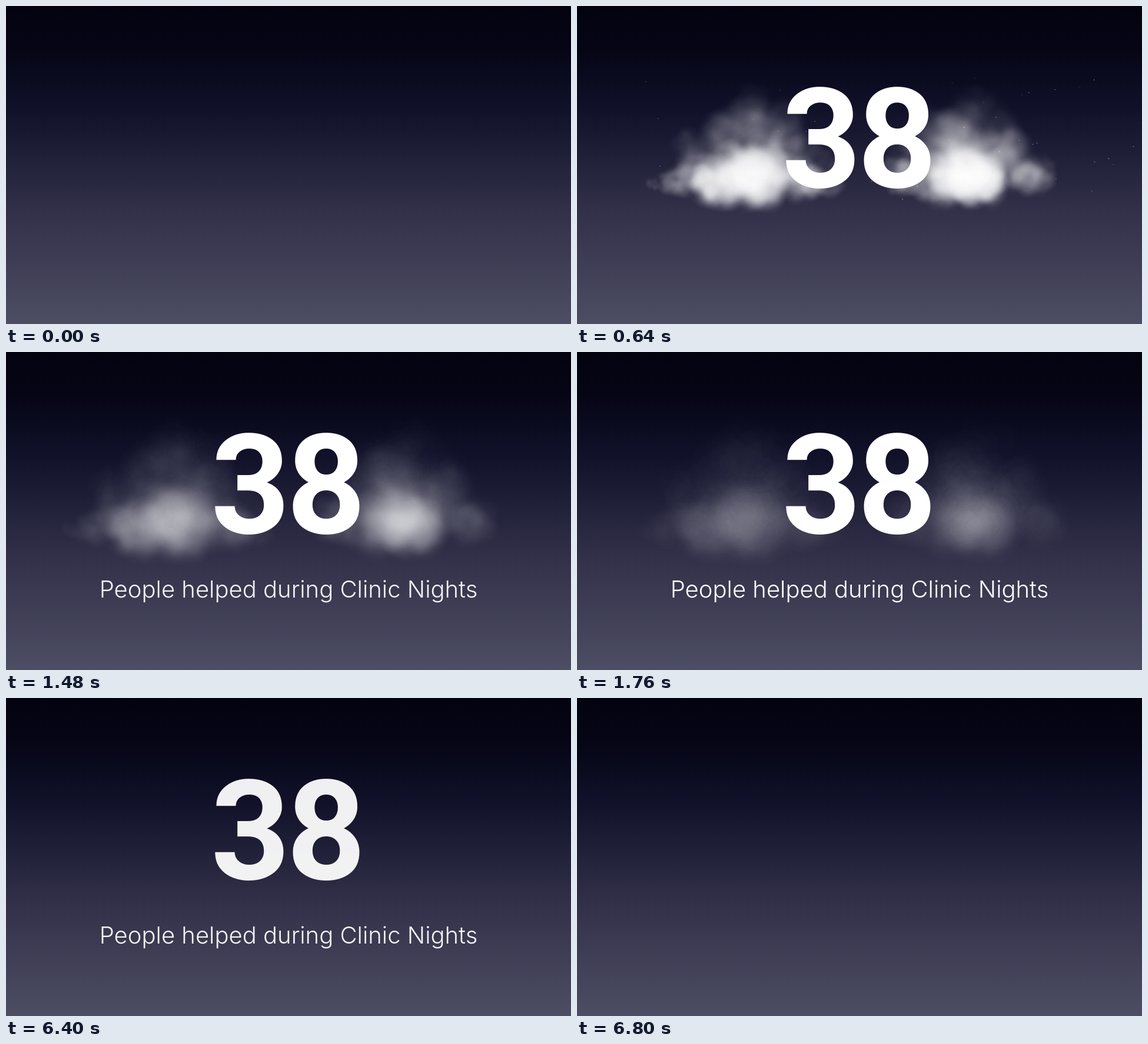
An HTML page with a canvas for the animation above (6.88 s loop, 960 px wide and 540 px high).

```html
<!DOCTYPE html>
<html lang="en">
<head>
<meta charset="utf-8">
<title>38 people helped</title>
<style>
  html, body { margin: 0; width: 100%; height: 100%; overflow: hidden; }
  body {
    position: relative;
    background: linear-gradient(#030310, #050515 13%, #11112a 33%, #323149 65%, #4d4d64);
  }
  canvas, svg { position: absolute; left: 0; top: 0; width: 960px; height: 540px; }
  text { fill: #fff; }
  .number {
    font: bold 235px Roboto, "Liberation Sans", sans-serif;
    letter-spacing: -6px;
    animation: drop 6880ms infinite, leave 6880ms linear infinite;
  }
  .caption {
    font: 300 40px Inter, "Liberation Sans", sans-serif;
    font-optical-sizing: none;
    text-anchor: middle;
    animation: appear 6880ms linear infinite;
  }
  @keyframes drop {
    0%, .87% { transform: translateY(-330px); animation-timing-function: cubic-bezier(.333, 0, .667, .333); }
    4.36%, 100% { transform: none; }
  }
  @keyframes leave {
    0%, 92.7% { opacity: 1; }
    98.83%, 100% { opacity: 0; }
  }
  @keyframes appear {
    0%, 11.63% { opacity: 0; }
    22.09%, 92.7% { opacity: 1; }
    98.83%, 100% { opacity: 0; }
  }
</style>
</head>
<body>
<canvas width="960" height="540"></canvas>
<svg viewBox="0 0 960 540">
  <text class="number" x="348" y="307.5">38</text>
  <text class="caption" x="480" y="417">People helped during Clinic Nights</text>
</svg>
<script>
const LOOP = 6880, IMPACT = 300, SETTLED = 640, CLEAR = 2080;
const CENTER = 480, GROUND = 304;
const ctx = document.querySelector('canvas').getContext('2d');

let seed = 38;
const random = () => (seed = (seed * 16807) % 2147483647) / 2147483647;
const between = (a, b) => a + (b - a) * random();
const repeat = (count, make) => Array.from({ length: count }, (_, i) => make(i));

// Lumpy white puff built from overlapping soft discs
function makePuffSprite() {
  const sprite = document.createElement('canvas');
  sprite.width = sprite.height = 128;
  const g = sprite.getContext('2d');
  for (let i = 0; i < 30; i++) {
    const angle = between(0, Math.PI * 2), dist = 36 * Math.sqrt(random());
    const x = 64 + dist * Math.cos(angle), y = 64 + dist * Math.sin(angle);
    const soft = g.createRadialGradient(x, y, 0, x, y, between(18, 28));
    soft.addColorStop(0, 'rgba(255,255,255,.2)');
    soft.addColorStop(1, 'rgba(255,255,255,0)');
    g.fillStyle = soft;
    g.fillRect(0, 0, 128, 128);
  }
  return sprite;
}
const sprites = repeat(4, makePuffSprite);

// Two mirrored lobes: puffs are larger and rise higher mid-lobe, thinner towards the top
function makePuff(i) {
  const side = i % 2 ? 1 : -1;
  const reach = (random() + random()) / 2;
  const hump = Math.sin(Math.PI * reach);
  const height = random() ** 2;
  const offset = side * (10 + 350 * reach);
  return {
    fromX: CENTER + offset * .5,
    x: CENTER + offset,
    y: GROUND + between(-10, 6) - 135 * hump * height,
    r: (14 + 28 * hump) * between(.85, 1.2),
    alpha: .06 + .38 * (1 - height) ** 1.5 * Math.sqrt(hump),
    turn: between(0, Math.PI * 2),
    sprite: sprites[i % sprites.length]
  };
}
const puffs = repeat(170, makePuff);

const sparks = repeat(50, () => ({
  x: CENTER + between(-110, 110),
  vx: between(-950, 1150),
  vy: between(-620, 0),
  size: between(1, 2.2),
  alpha: between(.25, .8)
}));

const expansion = t => 1 - Math.exp(-(t - IMPACT) / 150);

function drawSmoke(t) {
  const spread = expansion(t) / expansion(SETTLED);
  const late = Math.max(0, t - SETTLED) / 1000;
  const density = ((CLEAR - t) / (CLEAR - SETTLED)) ** 1.6;
  for (const p of puffs) {
    const r = p.r * (.35 + .8 * spread + .2 * late);
    ctx.save();
    ctx.globalAlpha = Math.min(1, p.alpha * density);
    ctx.translate(p.fromX + (p.x - p.fromX) * spread, GROUND + (p.y - GROUND) * spread);
    ctx.rotate(p.turn + .3 * late);
    ctx.drawImage(p.sprite, -r, -r, r * 2, r * 2);
    ctx.restore();
  }
}

function drawSparks(t) {
  const s = (t - IMPACT) / 1000;
  const fade = Math.max(0, 1 - s / .6);
  ctx.fillStyle = '#fff';
  for (const p of sparks) {
    ctx.globalAlpha = p.alpha * fade;
    ctx.fillRect(p.x + p.vx * s, GROUND + p.vy * s + 200 * s * s, p.size, p.size);
  }
  ctx.globalAlpha = 1;
}

let start;
function frame(now) {
  start ??= now;
  const t = (now - start) % LOOP;
  ctx.clearRect(0, 0, 960, 540);
  if (t > IMPACT && t < CLEAR) {
    drawSmoke(t);
    drawSparks(t);
  }
  requestAnimationFrame(frame);
}
requestAnimationFrame(frame);
</script>
</body>
</html>
```
